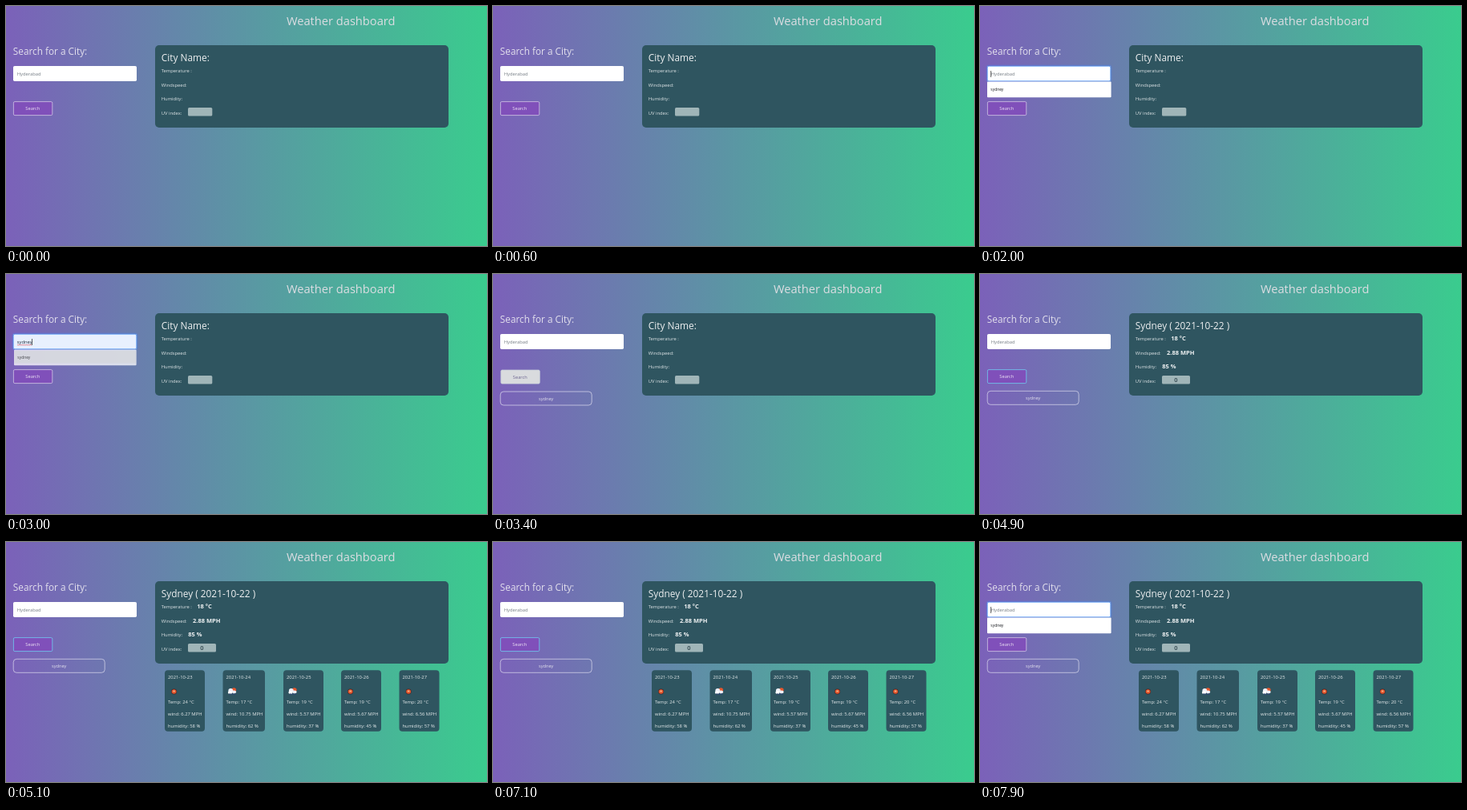
An HTML page with a canvas for the animation above (8000 ms loop, 600 by 300 pixels).

```html
<!DOCTYPE html>
<html lang="en">
<head>
<meta charset="utf-8">
<title>Weather dashboard</title>
<style>
  html, body { margin: 0; width: 100%; height: 100%; overflow: hidden; }
  canvas { display: block; width: 600px; height: 300px; }
</style>
</head>
<body>
<canvas id="stage" width="600" height="300"></canvas>
<script>
const ctx = document.getElementById('stage').getContext('2d');
const LOOP = 8000, STEP = 100;
const PANEL = '#2f5560';
const SMALL = 5.8;

// left, width, date, temperature, wind, humidity, cloudy
const forecast = [
  [198, 50, '2021-10-23', 24, '6.27', 58, false],
  [270.5, 52.5, '2021-10-24', 17, '10.75', 62, true],
  [346, 50, '2021-10-25', 19, '5.57', 37, true],
  [418, 50, '2021-10-26', 19, '5.67', 45, false],
  [490.5, 50, '2021-10-27', 20, '6.56', 57, false]
];

const between = (t, a, b) => t >= a && t < b;
const ramp = (t, a, b) => Math.min(1, Math.max(0, (t - a) / (b - a)));
const mix = (a, b, k) => `rgb(${a.map((v, i) => Math.round(v + (b[i] - v) * k))})`;

function box(x, y, w, h, r, fill, stroke, line = 0.8) {
  ctx.beginPath();
  ctx.roundRect(x, y, w, h, r);
  if (fill) { ctx.fillStyle = fill; ctx.fill(); }
  if (stroke) { ctx.strokeStyle = stroke; ctx.lineWidth = line; ctx.stroke(); }
}

function text(str, x, y, size, color, weight = 400, align = 'left') {
  ctx.font = `${weight} ${size}px "Open Sans", sans-serif`;
  ctx.textAlign = align;
  ctx.fillStyle = color;
  ctx.fillText(str, x, y);
}

function disc(x, y, rx, ry, color) {
  ctx.beginPath();
  ctx.ellipse(x, y, rx, ry, 0, 0, Math.PI * 2);
  ctx.fillStyle = color;
  ctx.fill();
}

function withAlpha(alpha, draw) {
  ctx.save();
  ctx.globalAlpha = alpha;
  draw();
  ctx.restore();
}

function background() {
  const g = ctx.createLinearGradient(0, 0, 600, 0);
  g.addColorStop(0, 'rgb(123,97,185)');
  g.addColorStop(1, 'rgb(58,204,142)');
  ctx.fillStyle = g;
  ctx.fillRect(0, 0, 600, 300);
}

function searchInput(t) {
  const focus = t < 5000
    ? ramp(t, 900, 1100) * (1 - ramp(t, 3200, 3400))
    : ramp(t, 7600, 7800);
  const filled = between(t, 2700, 3300);
  if (focus) withAlpha(focus, () => box(7.5, 73.5, 157, 22, 3, 'rgba(70,130,240,.3)'));
  box(9, 75, 154, 19, 1.8, filled ? '#e8f0fe' : '#fff');
  if (focus) withAlpha(focus, () => box(9.3, 75.3, 153.4, 18.4, 1.8, null, '#5b9bf3'));

  if (filled) {
    text('sydney', 13.7, 87, SMALL, '#23313d');
    if (t >= 2900) {
      ctx.beginPath();
      for (let x = 14; x <= 32; x += 0.5) ctx.lineTo(x, 88.7 + 0.4 * Math.sin(x * 2.6));
      ctx.strokeStyle = '#e0454b';
      ctx.lineWidth = 0.7;
      ctx.stroke();
    }
  } else {
    text('Hyderabad', 13.7, 87, SMALL, '#737b83');
  }

  const startCaret = between(t, 1100, 1600) || between(t, 2000, 2600) || t >= 7800;
  const endCaret = between(t, 2900, 3300);
  ctx.fillStyle = '#222';
  if (startCaret) ctx.fillRect(13.4, 81, 0.7, 8);
  if (endCaret) ctx.fillRect(32.3, 81, 0.7, 8);
}

function suggestions(t) {
  const alpha = t < 5000
    ? ramp(t, 900, 1100) * (1 - ramp(t, 2950, 3150))
    : ramp(t, 7600, 7800);
  if (!alpha) return;
  const hover = between(t, 2700, 3200);
  const inset = t < 5000 && t >= 3000 ? 1 : 0;
  withAlpha(alpha, () => {
    box(9 + inset, 94.6, 154.6 - 2 * inset, 19.6, 1, '#fff');
    if (hover) box(9.5 + inset, 96, 153.6 - 2 * inset, 15.5, 0, '#d3d6db');
    text('sydney', 13.3 + inset, 106.2, 4.95, '#15181c');
  });
}

function searchButton(t) {
  const hover = ramp(t, 3100, 3300) * (1 - ramp(t, 3850, 4100));
  const focused = between(t, 3300, 7700);
  const shift = hover * 0.5;
  const fill = mix([128, 80, 186], [217, 219, 222], hover);
  const edge = hover > 0.5 ? '#c9d2da' : focused ? '#70cdf2' : '#d2c6e6';
  box(9.4 + shift, 119.6 + shift, 48.4, 17, 1.5, fill, edge);
  text('Search', 33.3 + shift, 130.1 + shift, SMALL - 0.1,
    mix([236, 228, 244], [112, 104, 146], hover), 400, 'center');
}

function history(t) {
  if (t < 3400) return;
  const y = t < 3500 ? 147 : 146.3;
  box(9.2, y, 114, 17, 4, null, 'rgba(226,224,240,.85)');
  text('sydney', 66.2, y + 10.5, SMALL - 0.1, '#e2e0ec', 400, 'center');
}

function current(t) {
  const loaded = t >= 4300;
  box(186, 49, 366, 103, 5, PANEL);
  text(loaded ? 'Sydney ( 2021-10-22 )' : 'City Name:', 193.8, 69, 11.85, '#eef0f1', 500);
  ['Temperature :', 'Windspeed:', 'Humidity:', 'UV index:'].forEach((label, i) =>
    text(label, 193.8, 83 + 17.5 * i, SMALL, '#dfe5e7'));
  box(227, 127, loaded ? 35 : 30.3, 10.6, 1.6, '#a0b5b8');
  if (!loaded) return;
  text('18 °C', 238.3, 83, 7.5, '#eef1f2', 700);
  text('2.88 MPH', 233, 100.6, 7.5, '#eef1f2', 700);
  text('85 %', 227.3, 118, 7.5, '#eef1f2', 700);
  text('0', 244.3, 135.4, 7.5, '#2c4249', 600, 'center');
}

function sunIcon(x, y) {
  disc(x, y, 3.5, 3.4, '#43282a');
  disc(x, y, 2.9, 2.8, '#e4572e');
  disc(x, y - 0.5, 1.4, 0.9, '#f5b183');
}

function cloudIcon(x, y) {
  disc(x + 2.2, y - 2, 2.8, 2.7, '#e4572e');
  disc(x - 1.8, y - 1.4, 2.9, 2.6, '#eef0f8');
  disc(x + 2.4, y + 0.5, 2.6, 2.1, '#eef0f8');
  disc(x - 2.6, y + 1, 2.7, 2, '#ffffff');
  ctx.fillStyle = '#34447c';
  for (const dx of [-3.3, -0.4, 2.5]) ctx.fillRect(x + dx, y + 2.2, 1.2, 2);
}

function cards(t) {
  if (t < 5000) return;
  for (const [x, w, date, temp, wind, humidity, cloudy] of forecast) {
    const left = x + 4;
    box(x, 160.3, w, 76.4, 4, PANEL);
    [[date, 171], [`Temp: ${temp} °C`, 201.5], [`wind: ${wind} MPH`, 216.7],
     [`humidity: ${humidity} %`, 231.9]].forEach(([line, y]) =>
      text(line, left, y, 5.85, '#e6ebec'));
    if (t >= 5100) (cloudy ? cloudIcon : sunIcon)(left + 7.6, 187);
  }
}

function draw(t) {
  background();
  text('Weather dashboard', 350, 24, 14.65, '#dcdde2', 500);
  text('Search for a City:', 8.8, 61.3, 11.8, '#e2dfec', 500);
  searchInput(t);
  searchButton(t);
  suggestions(t);
  history(t);
  current(t);
  cards(t);
}

const start = performance.now();
function tick() {
  const t = (performance.now() - start) % LOOP;
  draw(Math.floor(t / STEP) * STEP);
  requestAnimationFrame(tick);
}
tick();
</script>
</body>
</html>
```
